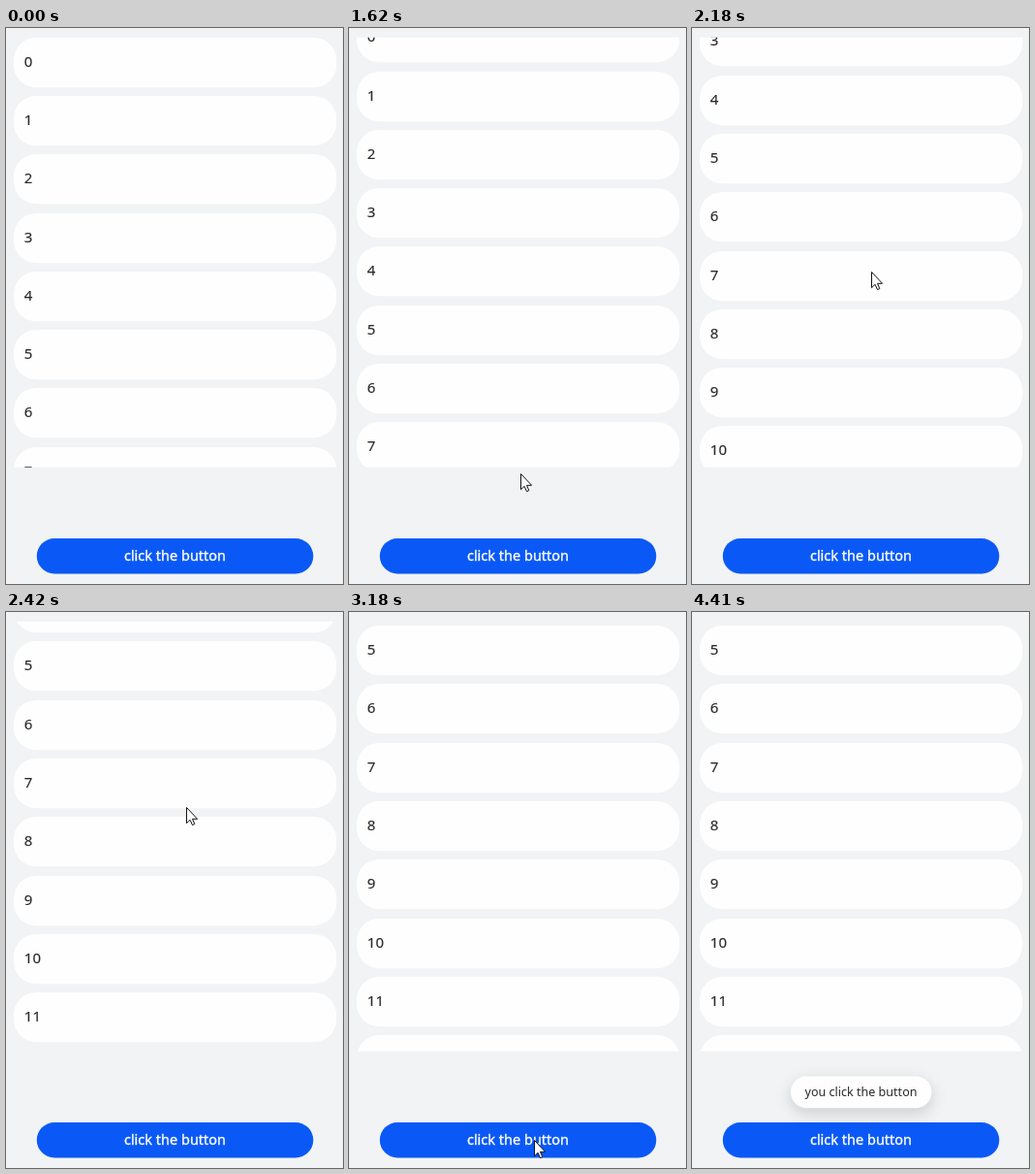
Animation, 348 px wide and 573 px high, one loop 5660 ms. Source, as an HTML page:

```html
<!DOCTYPE html>
<html lang="en">
<head>
<meta charset="utf-8">
<title>Scrolling list with button</title>
<style>
  html, body { margin: 0; width: 100%; height: 100%; overflow: hidden; background: #f1f3f5; }
  svg { display: block; width: 100vw; height: 100vh; }
  text { font-family: "Noto Sans", "Open Sans", sans-serif; fill: #2a2a2a; }
  .row { font-size: 15px; stroke: #2a2a2a; stroke-width: .15px; }
  .mid { text-anchor: middle; }
  #label { font-size: 14.5px; fill: #fff; stroke: #fff; stroke-width: .35px; }
  #toast text { font-size: 12.55px; }
  #toast rect { filter: drop-shadow(0 5px 8px rgba(0, 0, 0, .16)); }
</style>
</head>
<body>
<svg viewBox="0 0 348 573">
  <defs>
    <clipPath id="view"><rect y="9.7" width="348" height="443.1"/></clipPath>
  </defs>
  <g clip-path="url(#view)"><g id="list"></g></g>
  <rect id="button" x="31.8" y="526" width="285.5" height="36.4" rx="18.2"/>
  <text id="label" class="mid" x="174.5" y="549">click the button</text>
  <g id="toast">
    <rect x="102" y="478.6" width="145.3" height="32.6" rx="16.3" fill="#fefefe"/>
    <text class="mid" x="174.5" y="499">you click the button</text>
  </g>
  <path id="cursor" d="M.5.5V16.7L4.1 13.3 6.5 18.6 8.8 17.6 6.5 12.3H11.6z"
        fill="#fff" stroke="#111" stroke-width="1" stroke-linejoin="round"/>
</svg>
<script>
const LOOP = 5660, STEP = 40;
const ROWS = 14, TOP = 9.7, PITCH = 60.3;
const $ = id => document.getElementById(id);
const move = (el, x, y) =>
  el.setAttribute("transform", `translate(${Math.round(x)} ${Math.round(y)})`);

// Each burst of motion advances in steps counted from its own start.
const starts = [0, 200, 730, 1380, 3800, 4290];

// Pointer glides per axis: [begin, end, distance]
const glideX = [[200, 400, 21], [660, 1130, 35.5], [1340, 2480, 11],
                [2520, 2760, 14.5], [2800, 3140, -10], [4250, 4410, 76]];
const glideY = [[200, 400, -62], [890, 1130, 5], [1340, 2480, -306],
                [2520, 3180, 345], [4250, 4410, 28]];

const clamp = (v, max) => Math.min(max, Math.max(0, v));
const ease = u => u * u * (3 - 2 * u);
const glide = (legs, from, t) => legs.reduce(
  (sum, [a, b, d]) => sum + d * ease(clamp((t - a) / (b - a), 1)), from);

// List offset: speed up, follow the drag evenly, slow down
function scroll(t) {
  const length = 1160, up = 374, down = 145, speed = .33;
  const s = clamp(t - 1380, length);
  const gain = Math.min(s, up), loss = Math.max(0, s - (length - down));
  return speed * (s - gain + gain * gain / (2 * up) - loss * loss / (2 * down));
}

for (let i = 0; i < ROWS; i++) {
  $("list").innerHTML +=
    `<g><rect x="8" width="333.2" height="51.2" rx="23" fill="#fefefe"/>` +
    `<text class="row" x="18.8" y="30">${i}</text></g>`;
}
const rows = [...$("list").children];

function draw(time) {
  const from = starts.filter(s => s <= time).pop();
  const t = from + Math.floor((time - from) / STEP) * STEP;

  rows.forEach((row, i) => move(row, 0, TOP + i * PITCH - scroll(t)));

  const pressed = t >= 3800 && t < 3920;
  $("button").setAttribute("fill", pressed ? "#0950de" : "#0a59f7");
  $("toast").setAttribute("opacity", t < 3920 ? 0 : t < 3960 ? .5 : 1);

  const shown = t >= 200 && t < 4410;
  $("cursor").setAttribute("visibility", shown ? "visible" : "hidden");
  move($("cursor"), glide(glideX, 119, t), glide(glideY, 562, t));
}

const begin = performance.now();
function tick() {
  draw((performance.now() - begin) % LOOP);
  requestAnimationFrame(tick);
}
tick();
</script>
</body>
</html>
```
